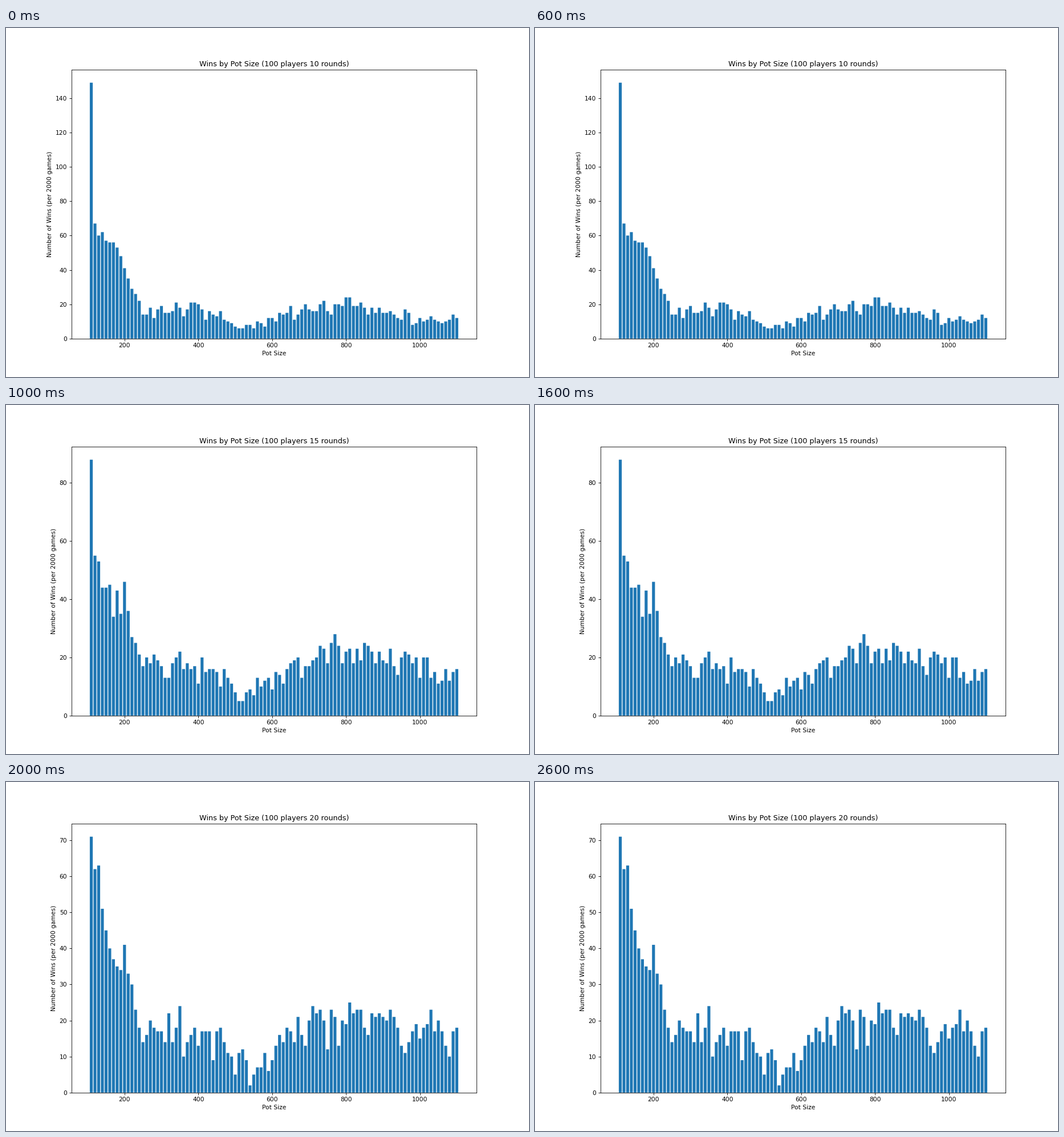
A matplotlib script for the animation above (3000 ms loop, 917 by 611 pixels).

```python
import matplotlib.pyplot as plt
import numpy as np
from matplotlib.animation import FuncAnimation

W, H = 917, 611
DPI = W / 12  # a figure 12 inches wide
EPS = 1e-6  # guards against truncation when inches become pixels

pots = np.arange(110, 1101, 10)

# Average trend of each run at a few pot sizes
knots = [110, 120, 150, 200, 250, 340, 410, 500, 550, 660, 800, 900, 1000, 1100]
trends = {
    10: [149, 67, 58, 43, 17, 19, 18, 7, 7, 18, 22, 16, 11, 10],
    15: [88, 55, 42, 37, 16, 18, 18, 9, 8, 16, 24, 21, 14, 15],
    20: [71, 62, 43, 37, 18, 18, 18, 11, 6, 17, 22, 22, 16, 16],
}


def count_wins(rounds):
    """Trend plus scatter that grows with the square root of the count."""
    rng = np.random.default_rng(rounds)
    mean = np.interp(pots, knots, trends[rounds])
    scatter = rng.normal(0, 0.7, len(pots)) * np.sqrt(mean)
    scatter[:2] = 0  # the two leading bars sit on the trend
    return np.maximum(np.round(mean + scatter), 2)


runs = [(rounds, count_wins(rounds)) for rounds in trends]
fig, ax = plt.subplots(figsize=(W / DPI + EPS, H / DPI + EPS), dpi=DPI)


def draw(i):
    rounds, wins = runs[i]
    ax.clear()
    ax.bar(pots, wins, width=8, snap=False)
    ax.set_title(f"Wins by Pot Size (100 players {rounds} rounds)")
    ax.set_xlabel("Pot Size")
    ax.set_ylabel("Number of Wins (per 2000 games)")


anim = FuncAnimation(fig, draw, frames=len(runs), interval=1000, repeat=True)
plt.show()
```
